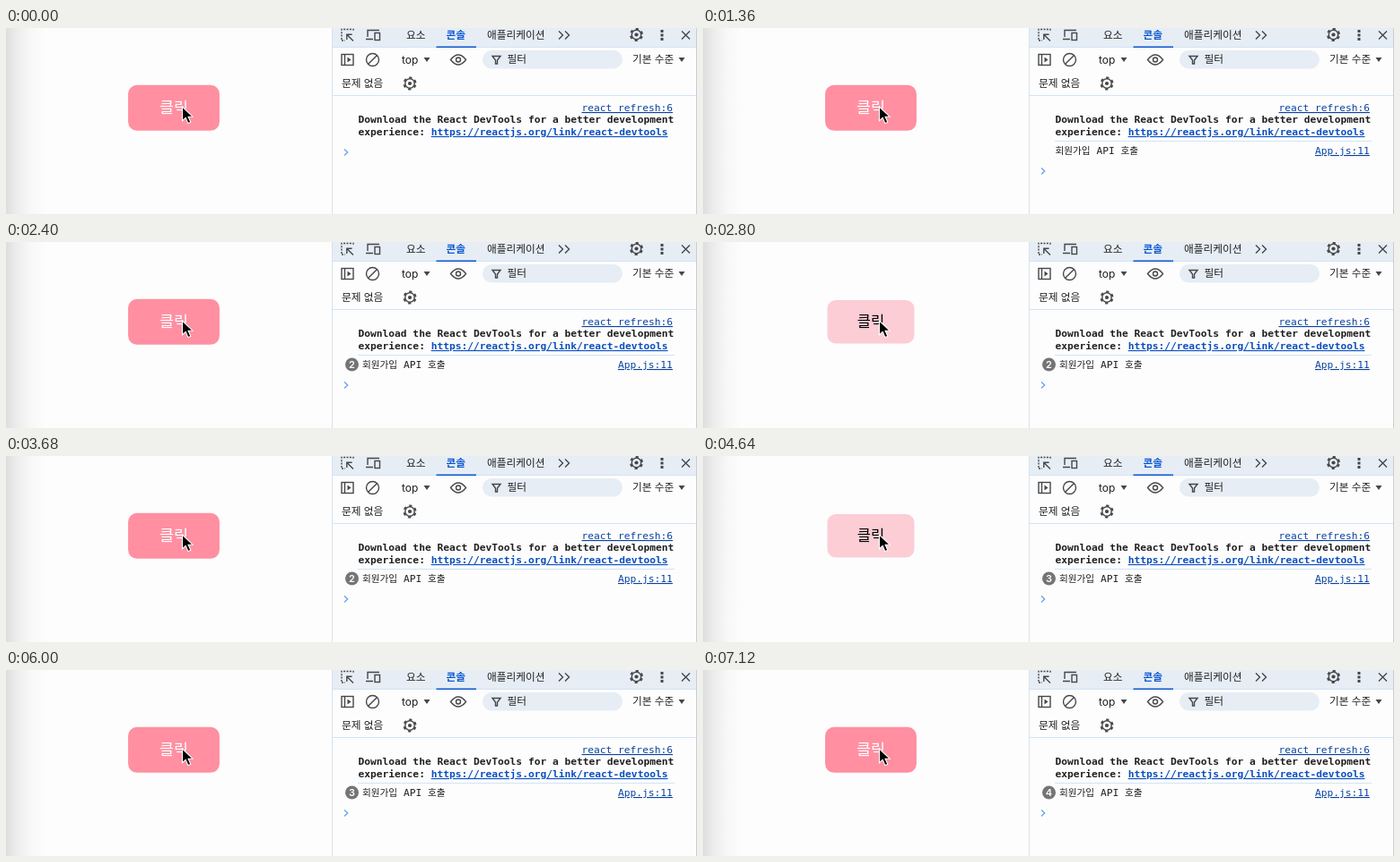
An HTML page that plays this animation: 770 px wide and 208 px high, repeating every 7200 ms.

```html
<!DOCTYPE html>
<html lang="ko">
<head>
<meta charset="utf-8">
<style>
html, body { margin: 0; width: 770px; height: 208px; overflow: hidden; background: #fdfdfd; }
svg { display: block; }
text { font: 11.7px "Noto Sans CJK KR", "Noto Sans CJK", "Noto Sans CJK JP", sans-serif; fill: #1f1f1f; white-space: pre; }
.mono { font: 11.24px "DejaVu Sans Mono", "Noto Sans CJK KR", monospace; }
.bold { font-weight: bold; }
.link { fill: #0842a0; text-decoration: underline; text-underline-offset: 1.5px; }
.bold .link { fill: #0b4fc0; }
.latin { font: 12px Inter, sans-serif; }
.ko { font-size: 10.65px; }
.icon { fill: none; stroke: #454749; stroke-width: 1.4; }
.solid { fill: #454749; stroke: none; }
</style>
</head>
<body>
<svg width="770" height="208" viewBox="0 0 770 208">
  <defs>
    <linearGradient id="shade">
      <stop offset="0" stop-color="#dedede"/>
      <stop offset=".25" stop-color="#ececec"/>
      <stop offset=".6" stop-color="#f8f8f8"/>
      <stop offset="1" stop-color="#fdfdfd"/>
    </linearGradient>
    <g id="gear" class="icon">
      <circle r="5.2"/>
      <circle r="6.5" stroke-width="2" stroke-dasharray="3.2 3.607" transform="rotate(16)"/>
      <circle r="2.1" class="solid"/>
    </g>
  </defs>

  <rect width="46" height="208" fill="url(#shade)"/>
  <g id="button">
    <rect x="-48.5" y="-24.3" width="97" height="48.6" rx="9.5"/>
    <text id="label" y="5.3" text-anchor="middle" style="font-size:16.6px;font-weight:500">클릭</text>
  </g>
  <path d="M196.500 88v15.700l3.700-3.300 2.700 6.200 2.900-1.200-2.700-6.200h5z" fill="#000" stroke="#fff" stroke-width="1.1"/>

  <!-- tab bar -->
  <rect x="364" width="405" height="21.500" fill="#e6edf5"/>
  <path d="M364 21.500h405M364 75.500h405" stroke="#d3e3f6"/>
  <path d="M363.500 0v208" stroke="#d8e2ec"/>
  <path d="M769.500 0v208" stroke="#c9ccd1"/>
  <g class="icon">
    <path d="M374 13V1.500H387V4" stroke-dasharray="2 1.4"/>
    <path d="M374 14h4" stroke-dasharray="2 1.4"/>
    <path d="M387 14.500l-7-7M379.800 13V7.300H385.600"/>
    <path d="M403 10V2.500H416M401 12.500H409"/>
    <rect x="411" y="5.500" width="5.500" height="8"/>
    <path d="M616 3.500l4.500 4.500-4.500 4.500M623 3.500l4.500 4.500-4.500 4.500"/>
    <path d="M753 3.500l9 9M762 3.500l-9 9"/>
  </g>
  <path class="solid" d="M729.500 2h3v3h-3zM729.500 6.500h3v3h-3zM729.500 11h3v3h-3z"/>
  <use href="#gear" x="702.500" y="7.500"/>
  <text x="446" y="11.500">요소</text>
  <text x="490.500" y="11.500" style="fill:#0b57d0;font-weight:700">콘솔</text>
  <text x="536" y="11.500">애플리케이션</text>
  <rect x="479.500" y="20.500" width="44.500" height="1.500" fill="#0b57d0"/>

  <!-- console toolbar -->
  <g class="icon">
    <rect x="374" y="29.500" width="13" height="12"/>
    <path d="M377.500 29.500v12"/>
    <circle cx="408.500" cy="35.500" r="7"/>
    <path d="M403.700 40.300l9.600-9.600"/>
    <path d="M495.500 35.500Q504 24.500 512.500 35.500Q504 46.500 495.500 35.500z"/>
    <circle cx="504" cy="35.500" r="2.500"/>
  </g>
  <path class="solid" d="M380.500 32.500l4 3-4 3zM465.500 33h7l-3.500 5zM749.500 33h7l-3.500 5z"/>
  <text class="latin" x="441" y="39.500">top</text>
  <rect x="531" y="25" width="156" height="20.500" rx="10.250" fill="#e6edf5"/>
  <path class="icon" d="M542 31.500h9l-3.500 4.500v4h-2v-4z"/>
  <text x="558.500" y="39.200">필터</text>
  <text x="698" y="39.200">기본 수준</text>
  <text x="374" y="65.700">문제 없음</text>
  <use href="#gear" x="450" y="62"/>

  <!-- messages -->
  <text class="mono link" x="641.500" y="93">react refresh:6</text>
  <text class="mono bold" x="392.500" y="106">Download the React DevTools for a better development</text>
  <text class="mono bold" x="392.500" y="120">experience: <tspan class="link">https://reactjs.org/link/react-devtools</tspan></text>
  <g id="log">
    <path d="M392 126.500h353" stroke="#d3e3f6"/>
    <g id="badge">
      <circle cx="385.500" cy="137" r="7.500" fill="#757575"/>
      <text id="count" class="latin" x="385.500" y="141" text-anchor="middle" style="fill:#fff;font-size:11px;font-weight:600"></text>
    </g>
    <text id="message" class="mono" y="141"><tspan class="ko">회원가입</tspan> API <tspan class="ko">호출</tspan></text>
    <text class="mono link" x="682" y="141">App.js:11</text>
  </g>
  <path id="prompt" d="M377 -3.500l3.700 3.500-3.700 3.500" fill="none" stroke="#6a9ff0" stroke-width="1.300"/>
</svg>
<script>
const LOOP = 7200, PRESS = 160;
const presses = [1040, 1600, 2160, 2720, 4080, 4560, 5040];
const FIRST_CALL = 400, THROTTLE = 2000;
const el = id => document.getElementById(id);
const set = (id, name, value) => el(id).setAttribute(name, value);
const show = (id, on) => set(id, 'visibility', on ? 'visible' : 'hidden');

function draw(now) {
  const t = now % LOOP;
  const pressed = presses.some(p => t >= p && t < p + PRESS);
  set('button', 'transform', `translate(187 89.3) scale(${pressed ? 1 : 1.05})`);
  set('button', 'fill', pressed ? '#fccdd5' : '#ff8fa1');
  el('label').style.fill = pressed ? '#000' : '#fff';

  // Calls are throttled; repeated messages collapse into a counter.
  const calls = t < FIRST_CALL ? 0 : Math.floor((t - FIRST_CALL) / THROTTLE) + 1;
  show('log', calls > 0);
  show('badge', calls > 1);
  el('count').textContent = calls;
  set('message', 'x', calls > 1 ? 397 : 392.5);
  set('prompt', 'transform', `translate(0 ${calls ? 160 : 139})`);
}

const start = performance.now();
function tick() {
  draw(performance.now() - start);
  requestAnimationFrame(tick);
}
tick();
</script>
</body>
</html>
```
